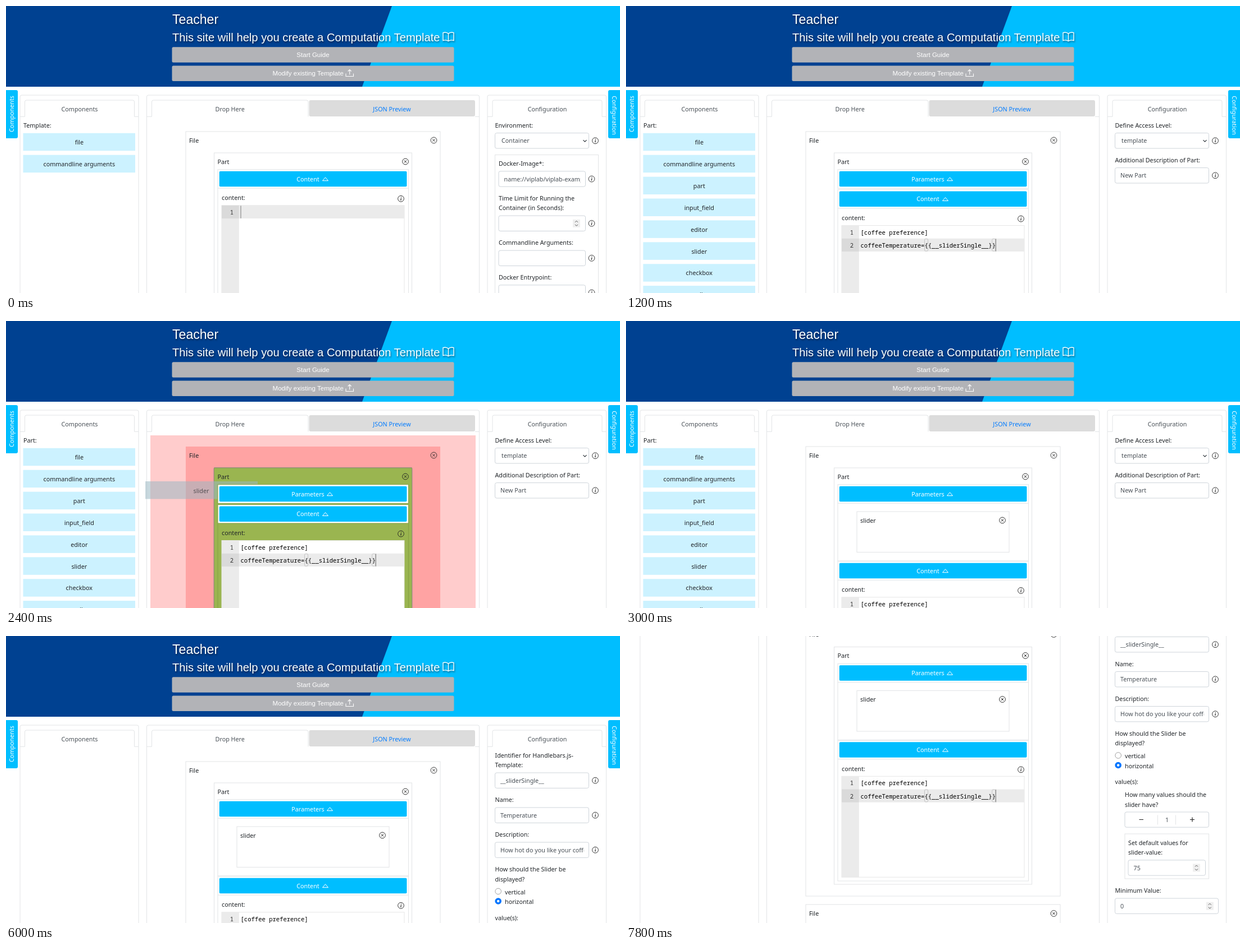
An HTML page for the animation above (8000 ms loop, 1093 by 512 pixels).

```html
<!DOCTYPE html>
<html lang="en">
<head>
<meta charset="utf-8">
<title>Template editor</title>
<style>
html, body { margin: 0; width: 100%; height: 100%; overflow: hidden; background: #fff; }
svg { display: block; width: 100vw; height: 100vh; }
text { font: 10.75px "Noto Sans", "Open Sans", sans-serif; fill: #212529; white-space: pre; }
.head { font-family: "Liberation Sans", Arial, sans-serif; fill: #fff; }
.h1 { font-size: 23.1px; }
.h2 { font-size: 20.2px; }
.btn { font-size: 11.55px; }
.shadow { filter: drop-shadow(1px 2px 1.5px rgba(0, 0, 0, .5)); }
.mono { font: 10.56px "Noto Sans Mono", "DejaVu Sans Mono", monospace; fill: #000; }
.num { fill: #333; }
.mid { text-anchor: middle; }
.white { fill: #fff; }
.soft { fill: #495057; }
.link { fill: #007bff; }
</style>
</head>
<body>
<svg id="stage" viewBox="0 0 1093 512" preserveAspectRatio="none"></svg>
<script>
const LOOP = 8000, STEP = 600;
const BLUE = '#00beff', LINE = '#e2e4e6', FIELD = '#ced4da';
const PARTS = ['file', 'commandline arguments', 'part', 'input_field', 'editor', 'slider', 'checkbox', 'radio'];
const stage = document.getElementById('stage');

// Boxes are given by their edges, text by its vertical centre.
const box = (x, y, x2, y2, fill = 'none', stroke = 'none', r = 0) =>
  `<rect x="${x}" y="${y}" width="${x2 - x}" height="${y2 - y}" rx="${r}" fill="${fill}" stroke="${stroke}"/>`;
const text = (x, y, s, cls = '') => `<text x="${x}" y="${y + 4}" class="${cls}">${s}</text>`;
const path = (d, stroke = LINE, w = 1, fill = 'none') =>
  `<path d="${d}" stroke="${stroke}" stroke-width="${w}" fill="${fill}"/>`;
const ring = (x, y) => `<circle cx="${x}" cy="${y}" r="5.4" fill="none" stroke="#222" stroke-width=".9"/>`;

const close = (x, y) => ring(x, y) +
  path(`M${x - 2.2} ${y - 2.2}l4.4 4.4m0-4.4l-4.4 4.4`, '#222', 1);
const info = (x, y) => ring(x, y) +
  path(`M${x + .4} ${y - 1}l-.7 4M${x + .5} ${y - 3.2}v1.1`, '#222', 1.2);
const spinner = (x, y) => box(x - 6.5, y - 7, x + 6.5, y + 7, '#efefef') +
  path(`M${x - 2.5} ${y - 2}l2.5-2.5 2.5 2.5M${x - 2.5} ${y + 2}l2.5 2.5 2.5-2.5`, '#555', 1);

// Clipped text field centred on y.
function field(x, x2, y, value = '', dx = 9.5) {
  return box(x, y - 13.7, x2, y + 13.7, '#fff', FIELD, 3) +
    `<svg x="${x}" y="${y - 13}" width="${x2 - x - 9}" height="26">${text(dx, 13.2, value, 'soft')}</svg>`;
}
const select = (y, value) => field(870.5, 1037.5, y, value, 11.5) +
  path(`M1027.5 ${y - 1.2}l3 3 3-3`, '#343a40', 1.3) + info(1049, y);

function header() {
  return box(0, 0, 1093, 144, BLUE) + path('M0 0H687L634 144H0z', 'none', 0, '#004191') +
    `<g class="shadow"><text x="296" y="32" class="head h1">Teacher</text>` +
    `<text x="296" y="62.5" class="head h2">This site will help you create a Computation Template</text>` +
    path('M787.5 49.5q-4-4-9.5-1.8v14q5.500-2 9.500 1q4-3 9.500-1v-14q-5.500-2.200-9.500 1.800zv13', '#fff', 1.4) + '</g>' +
    box(295.5, 73.3, 797.5, 100.8, '#b2b3b7', 'none', 2.5) + box(295.5, 106.6, 797.5, 134, '#b2b3b7', 'none', 2.5) +
    text(546.5, 87.2, 'Start Guide', 'head btn mid') + text(537.700, 120.4, 'Modify existing Template', 'head btn mid') +
    path('M605 120.500v5h13.500v-5M611.700 122.500v-9m-3 3l3-3 3 3', '#fff', 1.100);
}

function sideTabs() {
  return path('M0 150H18q3 0 3 3V233q0 3-3 3H0z', 'none', 0, BLUE) +
    path('M1093 150h-18q-3 0-3 3v80q0 3 3 3h18z', 'none', 0, BLUE) +
    `<g transform="translate(10 192.5) rotate(-90)">${text(0, 0, 'Components', 'mid white')}</g>` +
    `<g transform="translate(1082.5 195) rotate(90)">${text(0, 0, 'Configuration', 'mid white')}</g>`;
}

// Card with a raised tab between a and b.
function panel(x, x2, a, b, title) {
  return box(x, 159, x2, 900, '#fff', LINE, 3) +
    path(`M${x} 197.300H${a}V171q0-3 3-3H${b - 3}q3 0 3 3V197.300` + (x === 250.5 ? 'M835 197.300' : '') + `H${x2}`) +
    text((a + b) / 2, 183.500, title, 'mid soft');
}

function components(s) {
  if (s >= 7) return '';
  const list = PARTS.slice(0, s === 0 ? 2 : s === 1 ? 3 : 8);
  return text(31, 213, s === 0 ? 'Template:' : 'Part:') + list.map((name, i) => {
    const y = 226.8 + i * 38.9;
    return box(30.5, y, 230, y + 31.5, '#ccf2ff') + text(130.3, y + 16.2, name, 'mid');
  }).join('');
}

const bar = (y, name, w) => box(379.7, y - 13.8, 713.5, y + 13.7, BLUE, 'none', 2) +
  text(546.5 - 9, y, name, 'mid white') + path(`M${546.5 + w} ${y + 3.2}h10l-5-6z`, '#fff', 1);

function editor(y, typed) {
  const top = y + 47.3, row = top + (typed ? 23.2 : 0);
  let out = box(384, top, 709, top + 180, '#fff', '#e6e6e6') +
    box(384, top, 414.8, top + 180, '#ebebeb') +
    box(384, row, 414.8, row + 23.2, '#dadada') + box(414.8, row, 709, row + 23.2, '#ebebeb') +
    text(402, top + 12, '1', 'mono num mid');
  const caret = typed ? 658.3 : 418;
  if (typed) {
    out += text(402, row + 12, '2', 'mono num mid') +
      text(417.500, top + 12, '[coffee preference]', 'mono') +
      box(531.500, row + .5, 537.500, row + 22.500, 'none', '#c4c4c4', 2) +
      box(651.700, row + .5, 657.700, row + 22.500, 'none', '#c4c4c4', 2) +
      text(417.500, row + 12, 'coffeeTemperature={{__sliderSingle__}}', 'mono');
  }
  return out + path(`M${caret} ${row + .5}v22.500`, '#777');
}

function ghost(x, y) {
  return box(x, y, x + 200, y + 31.5, 'rgba(156,184,196,.55)') +
    `<g opacity=".7">${text(x + 99.5, y + 16.500, 'slider', 'mid')}</g>`;
}

function dropArea(s) {
  const drag = s === 3 || s === 4, dropped = s >= 5, params = s >= 2;
  const y = dropped ? 445.5 : params ? 344.3 : 308.500;
  const end = y + 234, edge = drag ? '#86a044' : LINE;
  let out = drag ? box(257, 204, 836, 900, '#ffcccc') : '';
  out += box(320, 224, 773, end + 27, drag ? '#ffa3a3' : '#fff', drag ? 'none' : LINE) +
    text(326, 239.500, 'File') + close(761.500, 239.500) +
    box(320, end + 42, 773, end + 300, drag ? '#ffa3a3' : '#fff', drag ? 'none' : LINE) +
    text(326, end + 58, 'File') + close(761.500, end + 58);
  if (s === 4) out += box(370, 261.500, 723, end + 6.500, 'none', '#a58b98', 2);
  out += box(370.500, 262, 722.500, end + 6, drag ? '#9ab550' : '#fff', s === 4 ? '#8f9468' : edge) +
    text(376.500, 277.500, 'Part') + close(711, 277.500);
  if (s === 3) out += ghost(45, 417);
  if (s === 4) out += ghost(248, 286);
  if (params) {
    const low = dropped ? 428 : 325.500;
    out += box(377, 291.700, 716.500, low, drag ? '#fff' : 'none', edge) + bar(308.500, 'Parameters', 25);
    if (dropped) {
      out += path('M377 325.300H716.500') + box(411, 340, 682, 412.500, '#fff', LINE) +
        text(417, 355.500, 'slider') + close(670, 355.500);
    }
  }
  if (drag) out += box(377, y - 16.800, 716.500, y + 16.500, '#fff');
  return out + box(377, y - 16.800, 716.500, end, 'none', edge) +
    path(`M377 ${y + 16.700}H716.500`, edge) + bar(y, 'Content', 17) +
    text(384, y + 33.500, 'content:') + info(703, y + 35.300) + editor(y, s > 0);
}

function containerForm() {
  const row = (y, label, value) => text(877, y - 27.500, label) + field(877, 1031.500, y, value) + info(1042.500, y);
  return text(870.500, 213, 'Environment:') + select(240.300, 'Container') +
    box(870.500, 265.500, 1054.500, 900, 'none', LINE) +
    row(308.500, 'Docker-Image*:', 'name://viplab/viplab-example') +
    text(877, 343.200, 'Time Limit for Running the') +
    row(387.800, 'Container (in Seconds):') + spinner(1015.500, 387.800) +
    row(449.800, 'Commandline Arguments:') + row(511.500, 'Docker Entrypoint:');
}

function partForm(s) {
  return text(870.500, 213, 'Define Access Level:') + select(240.300, s === 1 ? 'modifiable' : 'template') +
    text(870.500, 275, 'Additional Description of Part:') + field(870.500, 1037.500, 302.300, 'New Part') + info(1049, 302.300);
}

function sliderForm(s) {
  const row = (y, label, value) => text(870.500, y - 27.500, label) +
    field(870.500, 1037.500, y, value) + info(1049, y);
  const radio = (y, label, on) => `<circle cx="876.2" cy="${y - .5}" r="${on ? 4 : 5.3}" fill="#fff" ` +
    `stroke="${on ? '#0075ff' : '#8a8a8a'}" stroke-width="${on ? 3.6 : .8}"/>` + text(888, y + .5, label);
  return text(870.500, 213, 'Identifier for Handlebars.js-') +
    row(257.700, 'Template:', s < 8 ? '8d21a7fa-c86d-9576-9c6e-35d1' : '__sliderSingle__') +
    row(319.700, 'Name:', s < 9 ? 'Name' : 'Temperature') +
    row(381.700, 'Description:', s < 10 ? 'Add your description here...' : 'How hot do you like your coffee?') +
    text(870.500, 416, 'How should the Slider be') + text(870.500, 433.500, 'displayed?') +
    radio(456, 'vertical', false) + radio(473.500, 'horizontal', true) +
    text(870.500, 502.500, 'value(s):') +
    text(888, 525.500, 'How many values should the') + text(888, 543, 'slider have?') +
    box(888, 556.500, 1037.500, 583.700, '#fff', FIELD, 3) +
    path('M946.500 562v17M978.500 562v17') + text(963, 570.500, '1', 'mid soft') +
    path('M913.500 570h7.500M1004 570h8m-4-4v8', '#222', 1.2) +
    box(888, 595.500, 1037.500, 675.500, '#fff', LINE) +
    text(894, 611, 'Set default values for') + text(894, 628.500, 'slider-value:') +
    field(894, 1031.500, 656, s < 13 ? '50' : '75') + spinner(1015.500, 656) +
    text(870.500, 696.500, 'Minimum Value:') + field(870.500, 1054.500, 724.200, '0') + spinner(1039.300, 724.200) +
    text(870.500, 758.500, 'Maximum Value:') + field(870.500, 1054.500, 786, '100');
}

function render(s) {
  const scroll = s < 11 ? 0 : s === 11 ? 103.5 : 242.5;
  const form = s === 0 ? containerForm() : s < 7 ? partForm(s) : sliderForm(s);
  stage.innerHTML = `<g transform="translate(0 ${-scroll})">` + header() +
    panel(25, 236, 33.5, 228.5, 'Components') +
    panel(250.5, 842.5, 259.5, 538, 'Drop Here') +
    box(539.5, 168, 835, 197, '#dcdcdc', 'none', 3) + text(687, 183.5, 'JSON Preview', 'mid link') +
    panel(857, 1068.5, 866, 1061, 'Configuration') +
    sideTabs() + components(s) + dropArea(s) + form + '</g>';
}

let shown = -1;
function tick() {
  const step = Math.floor(performance.now() % LOOP / STEP);
  if (step !== shown) render(shown = step);
  requestAnimationFrame(tick);
}
tick();
</script>
</body>
</html>
```
